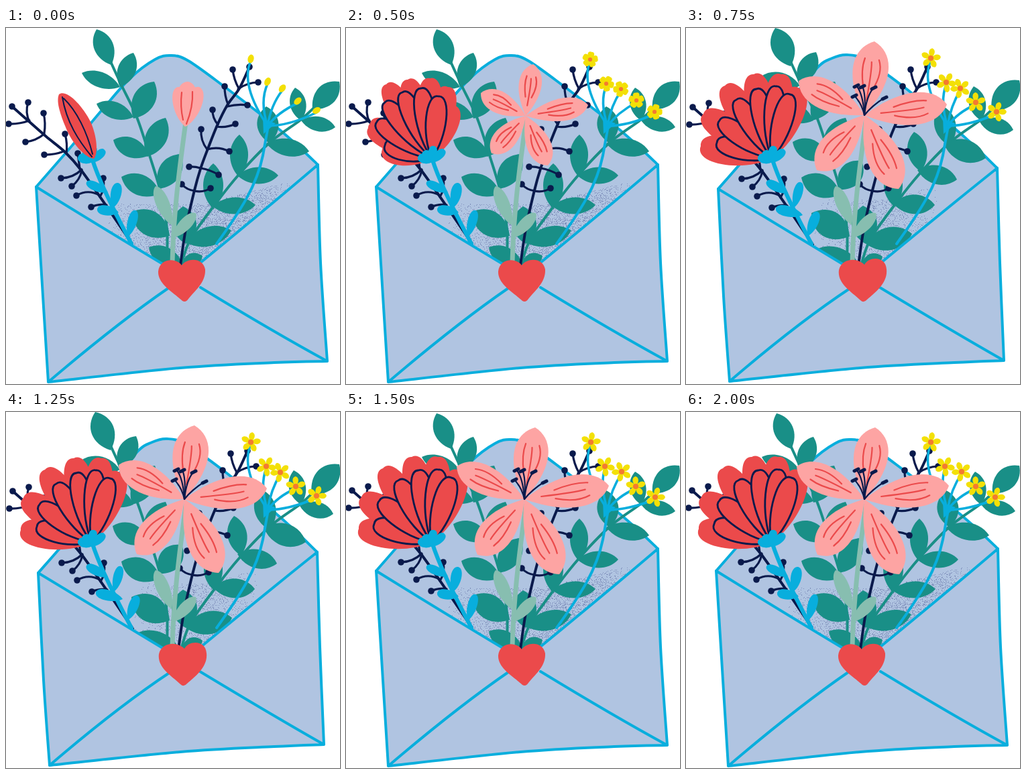
These frames come from a looping animation (498x531 px, 2.25 s). An HTML page:

```html
<!DOCTYPE html>
<html lang="en">
<head>
<meta charset="utf-8">
<title>Envelope bouquet</title>
<style>
html, body { margin: 0; width: 100%; height: 100%; overflow: hidden; background: #fff; }
svg { display: block; width: 100vw; height: 100vh; }
</style>
</head>
<body>
<svg id="stage" viewBox="0 0 498 531" stroke-linecap="round" stroke-linejoin="round"></svg>
<script>
const C = {
  paper: '#b0c4e1', line: '#08aedd', leaf: '#198f87', navy: '#0a1a4c', pink: '#fda4a3',
  red: '#eb4a4b', sage: '#87beb0', yellow: '#f3e006', orange: '#f47a30', dust: '#6f7eaf'
};

// Shape helpers
const r1 = n => Math.round(n * 10) / 10;
const fill = (d, c) => `<path d="${d}" fill="${c}"/>`;
const draw = (d, c, w, f = 'none') => `<path d="${d}" fill="${f}" stroke="${c}" stroke-width="${w}"/>`;
const dot = (x, y, r, c) => `<circle cx="${r1(x)}" cy="${r1(y)}" r="${r}" fill="${c}"/>`;
const each = (list, fn) => list.map(fn).join('');

// Smooth curve through the points
function curve(p) {
  let d = 'M' + p[0];
  for (let i = 0; i < p.length - 1; i++) {
    const a = p[i - 1] || p[i], b = p[i], c = p[i + 1], e = p[i + 2] || c;
    d += `C${r1(b[0] + (c[0] - a[0]) / 6)},${r1(b[1] + (c[1] - a[1]) / 6)} ` +
      `${r1(c[0] - (e[0] - b[0]) / 6)},${r1(c[1] - (e[1] - b[1]) / 6)} ${c}`;
  }
  return d;
}

// Maps (along, across) to stage coordinates on an axis from base to tip
function axis(x, y, tx, ty, w) {
  const dx = tx - x, dy = ty - y, k = w * 0.667 / Math.hypot(dx, dy);
  return (t, s) => `${r1(x + dx * t - dy * k * s)},${r1(y + dy * t + dx * k * s)}`;
}

function blade([x, y, tx, ty, w], a = 0.3, b = 0.75) {
  const p = axis(x, y, tx, ty, w);
  return `M${p(0, 0)}C${p(a, 1)} ${p(b, 1)} ${p(1, 0)}C${p(b, -1)} ${p(a, -1)} ${p(0, 0)}Z`;
}

// Two wobble poses
const poses = [
  {
    flap: [[45, 237], [98, 176], [145, 120], [185, 75], [222, 47], [246, 41], [272, 49], [325, 87], [395, 141], [430, 171], [465, 204]],
    bottom: [[479, 497], [63, 528]], left: [237, 354], right: [290, 350], low: [[242, 388], [290, 387]],
    sides: [[55, 400], [469, 350]],
    heart: 'M262,354C254,342 229,343 227,363C226,383 252,396 263,407Q268,410 272,404C281,392 298,380 297,360C294,342 270,342 262,354Z',
    dust: { n: 3600, x0: 150, x1: 425, top: 262 },
    sprigA: [
      [157, 55, 135, 2, 29], [170, 88, 190, 37, 27], [170, 88, 113, 67, 23], [190, 135, 221, 80, 33],
      [190, 133, 135, 113, 25], [210, 192, 238, 134, 32], [213, 190, 160, 167, 29], [228, 240, 260, 188, 33],
      [230, 247, 172, 222, 31], [244, 310, 188, 274, 37], [268, 322, 264, 266, 36], [264, 356, 213, 327, 28], [262, 352, 293, 340, 20]
    ],
    sprigB: [
      [457, 121, 497, 80, 31], [440, 138, 431, 89, 24], [440, 138, 491, 148, 22], [393, 172, 388, 117, 32],
      [388, 172, 452, 184, 26], [347, 222, 348, 159, 27], [345, 220, 406, 220, 25], [309, 270, 309, 202, 30],
      [308, 266, 372, 264, 25], [268, 320, 336, 302, 29]
    ],
    twig: [[0, 0], [0, 0]],
    blue: [[152, 245, 120, 230, 13], [160, 268, 167, 231, 16], [168, 275, 136, 270, 15], [182, 311, 193, 272, 14]]
  },
  {
    flap: [[48, 240], [100, 180], [150, 116], [195, 60], [218, 45], [240, 40], [268, 48], [325, 88], [395, 145], [430, 176], [464, 209]],
    bottom: [[474, 496], [65, 527]], left: [240, 356], right: [291, 350], low: [[245, 388], [289, 387]],
    sides: [[56, 400], [468, 350]],
    heart: 'M266,353C256,342 232,343 228,361C225,382 249,395 260,406Q265,411 270,405C283,394 301,380 299,360C298,340 273,340 266,353Z',
    dust: { n: 1700, x0: 190, x1: 375, top: 256 },
    sprigA: [
      [156, 57, 133, 0, 34], [168, 83, 194, 36, 28], [170, 86, 112, 72, 25], [188, 138, 222, 80, 33],
      [190, 138, 135, 116, 28], [208, 190, 238, 134, 32], [212, 194, 159, 170, 31], [228, 241, 262, 198, 34],
      [230, 248, 172, 223, 34], [244, 311, 187, 276, 40], [268, 322, 264, 265, 38], [262, 360, 197, 329, 30], [262, 352, 293, 341, 20]
    ],
    sprigB: [
      [456, 123, 497, 78, 34], [440, 138, 429, 87, 25], [438, 140, 488, 152, 24], [393, 176, 380, 115, 32],
      [384, 172, 447, 194, 33], [350, 214, 340, 155, 29], [345, 212, 404, 226, 28], [310, 266, 308, 206, 28],
      [309, 262, 371, 264, 29], [268, 322, 337, 307, 34]
    ],
    twig: [[1, 1], [-3, 0]],
    blue: [[152, 246, 120, 229, 14], [161, 268, 171, 230, 14], [174, 279, 134, 269, 16], [182, 310, 196, 274, 15]]
  }
];

const stemA = [[155, 48], [172, 85], [195, 133], [214, 190], [232, 250], [240, 300], [240, 350]];
const stemB = [[458, 120], [438, 138], [392, 172], [346, 220], [308, 268], [275, 315], [262, 350]];

// Twigs: stem, then berries as [berry x, y, joint x, y, bend]
const twigs = [
  {
    stem: [[9, 117], [35, 140], [60, 162], [88, 185], [112, 212], [150, 266], [188, 322]],
    berries: [
      [9, 117, 12, 120, 0], [33, 111, 35, 140, 0.2], [4, 143, 35, 138, 0.1], [56, 127, 57, 157, -0.1],
      [29, 170, 57, 158, 0.15], [57, 189, 86, 184, 0.1], [88, 158, 90, 187, -0.1], [82, 224, 113, 211, 0.2],
      [98, 236, 113, 212, 0.2], [107, 187, 110, 210, 0], [105, 250, 140, 250, -0.3],
      [127, 267, 150, 264, -0.15], [145, 224, 140, 252, -0.2]
    ]
  },
  {
    stem: [[363, 58], [348, 90], [330, 115], [315, 145], [301, 180], [290, 210], [281, 242], [268, 300], [260, 354]],
    berries: [
      [363, 58, 360, 66, 0], [338, 62, 347, 90, 0.1], [376, 81, 346, 91, 0.15], [326, 87, 331, 114, 0.1],
      [360, 115, 330, 117, 0.1], [308, 122, 316, 144, 0.2], [342, 143, 314, 147, -0.15], [291, 151, 300, 181, 0.2],
      [333, 184, 300, 181, 0.2], [273, 207, 290, 209, -0.1], [317, 219, 290, 209, 0.1],
      [262, 233, 282, 243, 0.2], [305, 239, 281, 243, -0.2]
    ]
  }
];

// Five stages of blossom
const fanBase = [128, 194];
const blooms = [
  {
    pose: 0, lily: null, fan: null, petal: 0,
    gold: [[365, 46], [390, 80], [412, 90], [435, 109], [463, 123]]
  },
  {
    pose: 1, petal: 8, gold: [[365, 46], [389, 81], [411, 90], [434, 109], [462, 124]],
    fan: { back: [[66, 164], [58, 122], [82, 88], [112, 80], [140, 98]], w: 38, front: [[82, 142], [92, 115], [116, 104]], fw: 26 },
    lily: { c: [267, 138], tips: [[245, 172, 20], [292, 176, 22], [230, 88, 28], [316, 94, 28], [273, 64, 32]] }
  },
  {
    pose: 0, petal: 11.5, gold: [[364, 47], [388, 83], [410, 91], [433, 108], [460, 125]],
    fan: {
      back: [[54, 181], [34, 148], [36, 142], [60, 84], [92, 77], [125, 75], [152, 88], [160, 115]], w: 38,
      front: [[58, 175], [46, 140], [58, 111], [84, 96], [112, 90], [138, 102]], fw: 30
    },
    lily: { c: [268, 131], tips: [[201, 97, 33], [361, 115, 34], [301, 205, 36], [217, 187, 34], [279, 54, 34]] }
  },
  {
    pose: 1, petal: 15, stamens: true, gold: [[365, 45], [388, 81], [409, 90], [432, 111], [463, 125]],
    fan: {
      back: [[22, 176], [26, 128], [58, 86], [101, 69], [142, 69], [169, 90]], w: 43,
      front: [[46, 171], [50, 138], [75, 107], [105, 91], [134, 87], [155, 99]], fw: 30
    },
    lily: { c: [266, 130], tips: [[168, 79, 44], [389, 114, 48], [317, 240, 51], [195, 212, 48], [281, 20, 53]] }
  },
  {
    pose: 0, petal: 15, stamens: true, gold: [[365, 45], [386, 81], [411, 89], [432, 111], [461, 127]],
    fan: {
      back: [[19, 174], [23, 127], [55, 84], [98, 67], [137, 67], [170, 88]], w: 43,
      front: [[42, 167], [50, 132], [78, 102], [108, 87], [138, 86], [157, 98]], fw: 32
    },
    lily: { c: [266, 130], tips: [[165, 81, 43], [392, 110, 48], [318, 242, 51], [196, 213, 50], [282, 23, 51]] }
  }
];

function dust({ n, x0, x1, top }) {
  let seed = 7, d = '';
  const rnd = () => (seed = seed * 16807 % 2147483647) / 2147483647;
  for (let i = 0; i < n; i++) {
    const x = x0 + (x1 - x0) * (rnd() + rnd()) / 2;
    const fold = x < 262 ? 237 + (x - 45) * 0.614 : 376 - (x - 262) * 0.845;
    const roof = x < 290 ? top : top - (x - 290) * 0.25;
    d += `M${Math.round(x)},${Math.round(fold - (fold - roof) * rnd() ** 1.3)}h1v1h-1z`;
  }
  return `<path d="${d}" fill="${C.dust}" opacity=".75"/>`;
}

const sprig = (stem, leaves) =>
  draw(curve(stem), C.leaf, 4) + each(leaves, l => fill(blade(l), C.leaf));

function twig({ stem, berries }, [ox, oy]) {
  const parts = each(berries, ([x, y, jx, jy, k]) => {
    const mx = (x + jx) / 2 - (jy - y) * k, my = (y + jy) / 2 + (jx - x) * k;
    return draw(`M${x},${y}Q${r1(mx)},${r1(my)} ${jx},${jy}`, C.navy, 3.2) + dot(x, y, 4.8, C.navy);
  });
  return `<g transform="translate(${ox} ${oy})">${draw(curve(stem), C.navy, 4)}${parts}</g>`;
}

const bends = [[349, 85], [378, 110], [395, 115], [405, 126], [422, 146]];

function goldSpray({ gold, petal }) {
  let s = draw('M314,322C350,272 374,235 383,190L391,146', C.line, 4) + fill('M384,158L383,134L391,139L402,142Z', C.line);
  s += each(gold, ([x, y], i) => draw(`M390,146Q${bends[i]} ${x},${y + 3}`, C.line, 3.6));
  return s + each(gold, ([x, y], i) => {
    if (!petal) return `<ellipse cx="${x}" cy="${y}" rx="4.5" ry="6.5" fill="${C.yellow}" transform="rotate(${15 + i * 11} ${x} ${y})"/>`;
    const sharp = petal > 12;
    let f = '';
    for (let k = 0; k < 5; k++) {
      const a = k * 1.2566 - 1.4 + i * 0.35;
      f += fill(blade([x, y, x + petal * Math.cos(a), y + petal * Math.sin(a), sharp ? 8.5 : petal * 0.85], 0.4, sharp ? 0.9 : 1.1), C.yellow);
    }
    return f + dot(x, y, petal * 0.27, C.orange);
  });
}

function redBloom({ fan }, blue) {
  let s = draw('M128,194C138,225 152,255 187,322', C.line, 6) + each(blue, l => fill(blade(l, 0.3, 1), C.line));
  const cup = each([[108, 191], [117, 183], [131, 176], [147, 182]], t => fill(blade([126, 201, ...t, 13], 0.3, 1.05), C.line));
  if (!fan) {
    return s + cup + fill('M79,99C88,92 108,108 124,136C134,154 139,185 131,195C119,194 101,175 91,153C82,132 74,110 79,99Z', C.red) +
      draw('M84,103C90,140 108,168 128,192M86,105C106,124 121,156 129,188', C.navy, 2);
  }
  s += each(fan.back, t => fill(blade([...fanBase, ...t, fan.w], 0.35, 1.06), C.red));
  s += each(fan.front, t => draw(blade([...fanBase, ...t, fan.fw], 0.35, 1.04), C.navy, 2.8, C.red));
  return s + cup;
}

function lilyBloom({ lily, stamens }) {
  let s = draw('M268,140C260,200 250,270 248,350', C.sage, 7) +
    each([[247, 294, 223, 236, 20], [248, 313, 283, 276, 18]], l => fill(blade(l, 0.3, 0.9), C.sage));
  if (!lily) {
    return s + each([[267, 147, 256, 88, 23], [268, 147, 288, 88, 25], [267, 147, 271, 80, 31]], p => fill(blade(p, 0.3, 0.98), C.pink)) +
      draw('M262,96C260,112 261,124 264,137M278,95C279,112 275,128 269,143', C.red, 2.2);
  }
  s += each(lily.tips, t => fill(blade([...lily.c, ...t], 0.45, 0.86), C.pink));
  s += each(lily.tips, t => {
    const p = axis(...lily.c, ...t);
    return draw(each([-1, 0, 1], k => {
      const from = k ? 0.36 : 0.2, to = k ? 0.76 : 0.72;
      return `M${p(from, k * 0.2)}Q${p(0.6, k * 0.48 + 0.06)} ${p(to, k * 0.3)}`;
    }), C.red, 2.2);
  });
  if (stamens) {
    const ends = [[251, 101], [254, 86], [263, 87], [280, 89], [296, 104]];
    s += each(ends, ([x, y]) => draw(`M266,130Q${(x + 266) / 2 + (x < 266 ? 4 : -4)},${y + 12} ${x},${y}`, C.navy, 2.2) +
      draw(`M${x - 3},${y + 2}l6,-3`, C.navy, 5));
  }
  return s;
}

function scene(b) {
  const p = poses[b.pose], a = p.flap[0], z = p.flap[p.flap.length - 1];
  const [br, bl] = p.bottom, [sl, sr] = p.sides, flap = curve(p.flap);
  const left = curve([a, sl, bl]), right = curve([z, sr, br]);
  const floor = curve([bl, [260, 507], [400, 499], br]);
  const pocket = `${left}${floor.replace('M', 'L')}L${sr}L${z}L${p.right}L262,374L${p.left}Z`;
  const folds = `M${a}Q150,302 ${p.left}M${z}Q390,268 ${p.right}` +
    `M${bl}Q165,441 ${p.low[0]}M${br}Q400,454 ${p.low[1]}`;
  return draw(`${flap}L262,380Z`, 'none', 0, C.paper) + dust(p.dust) + draw(flap, C.line, 4) +
    sprig(stemA, p.sprigA) + sprig(stemB, p.sprigB) +
    twig(twigs[0], p.twig[0]) + twig(twigs[1], p.twig[1]) +
    goldSpray(b) + redBloom(b, p.blue) + lilyBloom(b) +
    fill(pocket, C.paper) + draw(left + right + floor + folds, C.line, 4) + fill(p.heart, C.red);
}

const stage = document.getElementById('stage');
stage.innerHTML = each(blooms, b => `<g visibility="hidden">${scene(b)}</g>`);

const order = [0, 1, 2, 3, 4, 3, 4, 3, 4], step = 250;
let shown = -1;
const start = performance.now();
function tick(now) {
  const next = order[Math.floor(Math.max(0, now - start) / step) % order.length];
  if (next !== shown) {
    if (shown >= 0) stage.children[shown].setAttribute('visibility', 'hidden');
    stage.children[next].setAttribute('visibility', 'visible');
    shown = next;
  }
  requestAnimationFrame(tick);
}
tick(start);
</script>
</body>
</html>
```
